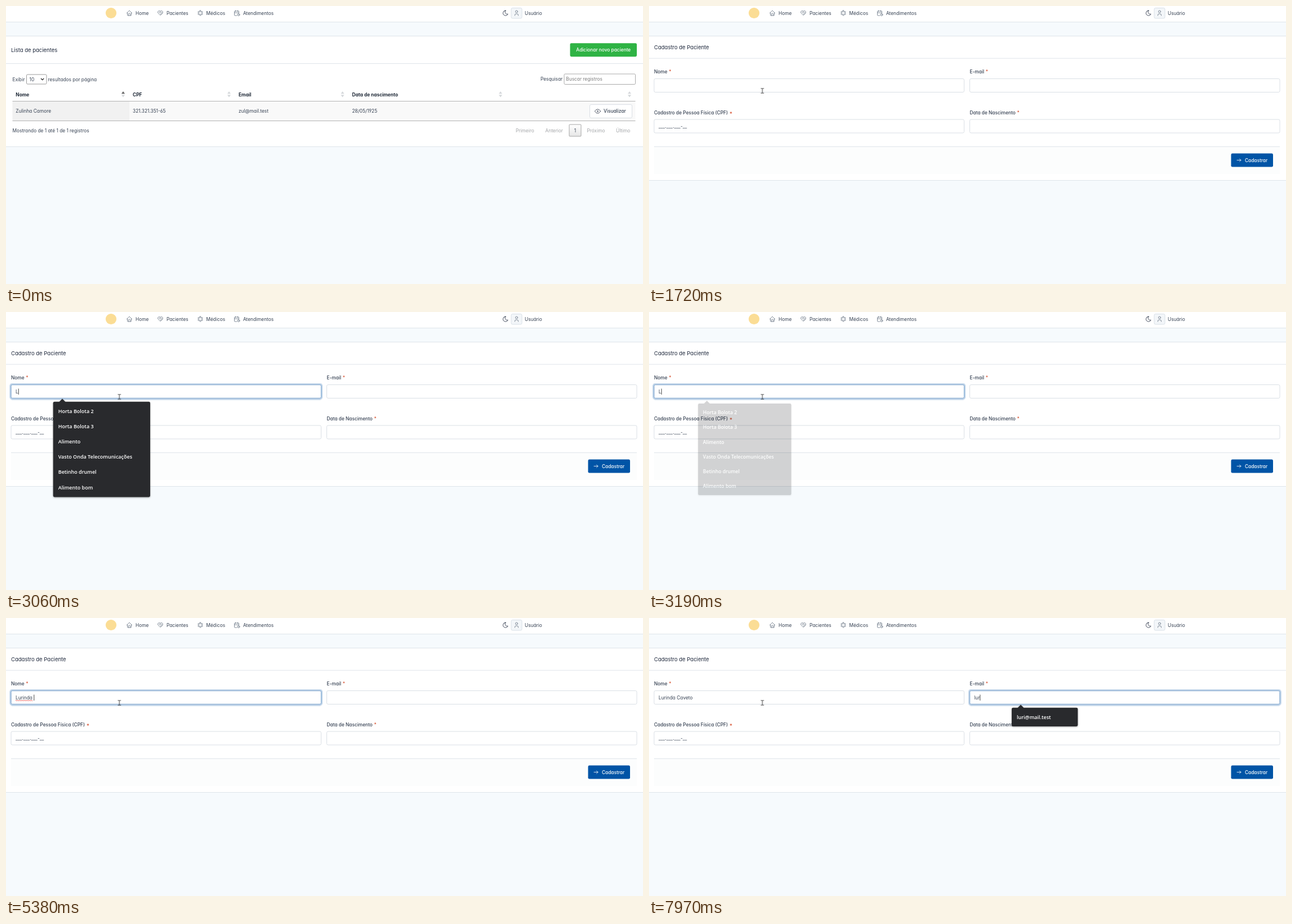
An HTML page that plays this animation: 1131 by 495 pixels, repeating every 8000 ms.

```html
<!DOCTYPE html>
<html lang="pt-BR">
<head>
<meta charset="utf-8">
<title>Cadastro de Paciente</title>
<style>
html, body { margin: 0; width: 100%; height: 100%; overflow: hidden; background: #f6fafd; }
svg { display: block; width: 1131px; height: 495px; }
text {
  font: 400 8.32px Inter, sans-serif;
  font-feature-settings: "cv03", "cv04", "cv11";
  fill: #354052;
}
.title { font-size: 9.5px; fill: #1d273b; }
.med { font-weight: 500; }
.bold { font-weight: 700; fill: #1f2937; }
.white { fill: #fff; }
.mute { fill: #a3a5a8; }
.req { fill: #d6502f; }
.mid { text-anchor: middle; }
.line { stroke: #dfe5ea; fill: none; }
.box { fill: #fff; stroke: #dadfe5; }
.icon { fill: none; stroke: #667382; stroke-width: 1.6; stroke-linecap: round; stroke-linejoin: round; }
.icon.dark { stroke: #1d273b; }
.popup { transform-box: fill-box; transform-origin: center; filter: drop-shadow(0 1px 1.5px rgba(0, 0, 0, .35)); }
.popup > * { fill: #292a2d; }
.popup text { font: 600 9px "Open Sans", "Noto Sans", sans-serif; fill: #fff; }
.ring rect { fill: none; stroke: #80aad3; }
.ring .glow { stroke: rgba(0, 84, 166, .25); stroke-width: 2.4; }

#list, #form, #add, #names, #mails, #squiggle { animation: 8s step-end infinite; }
#list { animation-name: list; }
#form { animation-name: form; }
#add { fill: #2fb344; animation-name: hover; }
#names { animation-name: names; }
#mails { animation-name: mails; }
#squiggle { fill: none; stroke: #e0302a; stroke-width: .7; animation-name: squiggle; }
#ringName { animation: ringName 8s linear infinite; }
#ringMail { animation: ringMail 8s linear infinite; }
#arrow { animation: arrow 8s infinite; }
#beam { animation: beam 8s infinite; }

@keyframes list { 0% { visibility: visible } 11.625%, 100% { visibility: hidden } }
@keyframes form { 0% { visibility: hidden } 11.625%, 100% { visibility: visible } }
@keyframes hover { 0% { fill: #2fb344 } 6.7%, 100% { fill: #2aa13d } }
@keyframes names {
  0% { opacity: 0; transform: scale(.97) }
  23.1% { opacity: .5; transform: scale(.98) }
  24% { opacity: 1; transform: none }
  39% { opacity: .6; transform: scale(.98) }
  39.875% { opacity: .2; transform: scale(.96) }
  40.6%, 100% { opacity: 0; transform: scale(.95) }
}
@keyframes mails {
  0% { opacity: 0 }
  96.25% { opacity: .5; transform: scale(.98) }
  97.125%, 100% { opacity: 1; transform: none }
}
@keyframes squiggle { 0% { opacity: 0 } 59% { opacity: 1 } 82.25%, 100% { opacity: 0 } }
@keyframes ringName { 0%, 22.375% { opacity: 0 } 23.8%, 82.25% { opacity: 1 } 84%, 100% { opacity: 0 } }
@keyframes ringMail { 0%, 82.25% { opacity: 0 } 83.875%, 100% { opacity: 1 } }
@keyframes arrow {
  0% { visibility: hidden; transform: translate(1064px, 448px); animation-timing-function: step-end }
  .875% { visibility: visible; transform: translate(1064px, 448px); animation-timing-function: steps(5) }
  5% { visibility: visible; transform: translate(1052px, 190px); animation-timing-function: steps(3) }
  7.5% { visibility: visible; transform: translate(1045px, 62px); animation-timing-function: steps(3) }
  10% { visibility: visible; transform: translate(1036px, 80px); animation-timing-function: step-end }
  11.625% { visibility: visible; transform: translate(1026px, 86px); animation-timing-function: step-end }
  12.5% { visibility: visible; transform: translate(1005.5px, 98.5px); animation-timing-function: steps(6) }
  17.375% { visibility: hidden; transform: translate(560px, 129px); animation-timing-function: step-end }
  100% { visibility: hidden; transform: translate(560px, 129px) }
}
@keyframes beam {
  0% { visibility: hidden; transform: translate(556px, 129px); animation-timing-function: step-end }
  17.375% { visibility: visible; transform: translate(556px, 129px); animation-timing-function: steps(5) }
  21.5%, 100% { visibility: visible; transform: translate(201.3px, 151px) }
}
</style>
</head>
<body>
<svg viewBox="0 0 1131 495">
  <defs>
    <linearGradient id="fade" x2="0" y2="1"><stop stop-color="#fff"/><stop offset="1" stop-color="#e6e6e6"/></linearGradient>
    <g id="sort"><path d="M-3 156.3h6l-3-4.3z"/><path d="M-3 158.2h6l-3 4.3z"/></g>
    <rect id="field" width="550.5" height="24" rx="2.4"/>
    <g id="ring" class="ring">
      <use href="#field"/>
      <rect width="550.5" height="24" rx="2.4"/>
      <rect class="glow" x="-1.5" y="-1.5" width="553.5" height="27" rx="3.6"/>
    </g>
  </defs>

  <rect width="1131" height="495" fill="#f6fafd"/>

  <!-- navbar -->
  <rect width="1131" height="28.5" fill="#fff"/>
  <path class="line" d="M0 28.5h1131"/>
  <circle cx="186.5" cy="12.5" r="9.6" fill="#fbdd95"/>
  <g class="icon">
    <g transform="translate(213 6.5) scale(.5)">
      <path d="M5 12H3l9-9 9 9h-2M5 12v7a2 2 0 0 0 2 2h10a2 2 0 0 0 2-2v-7M9 21v-6a2 2 0 0 1 2-2h2a2 2 0 0 1 2 2v6"/>
    </g>
    <g transform="translate(268 6.5) scale(.5)">
      <path d="M19.5 12.6 12 20l-7.5-7.4A5 5 0 1 1 12 6a5 5 0 1 1 7.5 6.6M12 6 8.7 9.3a1 1 0 0 0 0 1.4l.5.5a1.8 1.8 0 0 0 2.5 0l1-1a3.2 3.2 0 0 1 4.5 0l2.3 2.3M12.5 15.5l2 2M15 13l2 2"/>
    </g>
    <g transform="translate(339 6.5) scale(.5)">
      <path d="M11 3h2a1 1 0 0 1 1 1v4.5l4.5-2.5 2 3.4-4.5 2.6 4.5 2.6-2 3.4-4.5-2.5V20a1 1 0 0 1-1 1h-2a1 1 0 0 1-1-1v-4.500l-4.500 2.500-2-3.400L8 12 3.500 9.400l2-3.400L10 8.500V4a1 1 0 0 1 1-1z"/>
    </g>
    <g transform="translate(404 6.500) scale(.5)">
      <path d="M11.800 21H5a2 2 0 0 1-2-2V7a2 2 0 0 1 2-2h12a2 2 0 0 1 2 2v4M15 3v4M7 3v4M3 11h16M18 16.500V18l.5.5"/>
      <circle cx="18" cy="18" r="4"/>
    </g>
  </g>
  <text x="230" y="15.6">Home</text>
  <text x="285" y="15.6">Pacientes</text>
  <text x="355.5" y="15.6">Médicos</text>
  <text x="421" y="15.6">Atendimentos</text>
  <g class="icon dark" transform="translate(881 6.5) scale(.5)"><path d="M12 3h.4a7.5 7.5 0 0 0 7.9 12.400A9 9 0 1 1 12 3z"/></g>
  <rect x="897" y="3.5" width="19" height="18.5" rx="2.4" fill="#f3f6f9" stroke="#d9e0e7"/>
  <g class="icon" transform="translate(900.5 6.500) scale(.5)"><circle cx="12" cy="7" r="4"/><path d="M6 21v-2a4 4 0 0 1 4-4h4a4 4 0 0 1 4 4v2"/></g>
  <text x="921" y="15.6">Usuário</text>

  <g id="list">
    <path fill="#fff" d="M0 53.5h1131v197H0z"/>
    <path class="line" d="M0 53.5h1131M0 102.5h1131M0 250.5h1131"/>
    <text class="title" x="9" y="81.8">Lista de pacientes</text>
    <rect id="add" x="1001.5" y="66.2" width="118.5" height="24" rx="2.4"/>
    <text class="med white mid" x="1060.8" y="81.3">Adicionar novo paciente</text>

    <text x="11.5" y="133.6">Exibir</text>
    <rect x="36.500" y="122" width="35.500" height="17" rx="1.800" fill="#fff" stroke="#9a9a9a"/>
    <text x="41.500" y="133.6">10</text>
    <path d="m62 129 2.600 2.600 2.600-2.600" fill="none" stroke="#222" stroke-width="1.300"/>
    <text x="74.500" y="133.600">resultados por página</text>
    <text x="949" y="133.200">Pesquisar</text>
    <rect x="991" y="121" width="126.500" height="18.500" rx="1.800" fill="#fff" stroke="#aaa"/>
    <text x="994.300" y="133.200" style="fill:#7b7b7b">Buscar registros</text>

    <g class="head">
      <text class="bold" x="17.300" y="160.800">Nome</text>
      <text class="bold" x="225" y="160.800">CPF</text>
      <text class="bold" x="413" y="160.800">Email</text>
      <text class="bold" x="614.500" y="160.800">Data de nascimento</text>
    </g>
    <g fill="#d5d8db">
      <use href="#sort" x="208"/><use href="#sort" x="396"/><use href="#sort" x="597.500"/><use href="#sort" x="878"/><use href="#sort" x="1107"/>
    </g>
    <path d="M205 156.300h6l-3-4.300z" fill="#666"/>
    <path fill="#f9f9f9" d="M11.500 170h1106v34.500h-1106z"/>
    <path fill="#f1f1f1" d="M11.500 170h207.500v34.500H11.500z"/>
    <path d="M11.500 169.500h1106M11.500 204.500h1106" stroke="#b2b2b2"/>
    <text x="17.300" y="190.400">Zulinha Camore</text>
    <text x="225" y="190.400">321.321.351-65</text>
    <text x="413" y="190.400">zul@mail.test</text>
    <text x="614.500" y="190.400">28/05/1925</text>
    <rect class="box" x="1036.500" y="175.500" width="75" height="23.800" rx="2.400"/>
    <g class="icon dark" transform="translate(1044.500 181.400) scale(.5)"><circle cx="12" cy="12" r="2"/><path d="M22 12c-2.700 4.700-6 7-10 7s-7.300-2.300-10-7c2.700-4.700 6-7 10-7s7.300 2.300 10 7"/></g>
    <text class="med" x="1061" y="190.400">Visualizar</text>

    <text x="11.500" y="224.600">Mostrando de 1 até 1 de 1 registros</text>
    <text class="mute" x="905" y="224.600">Primeiro</text>
    <text class="mute" x="957.500" y="224.600">Anterior</text>
    <rect x="1000" y="211" width="21" height="21" rx="1" fill="url(#fade)" stroke="#a5a5a5"/>
    <text class="mid" x="1010.500" y="224.600">1</text>
    <text class="mute" x="1031.500" y="224.600">Próximo</text>
    <text class="mute" x="1083" y="224.600">Último</text>
  </g>

  <g id="form">
    <path fill="#fff" d="M0 53.500h1131v257H0z"/>
    <path fill="#fcfdfd" d="M9 251h1111v48H9z"/>
    <path class="line" d="M0 53.500h1131M0 93.200h1131M9 250.500h1111M0 310.500h1131"/>
    <text class="title" x="9" y="77">Cadastro de Paciente</text>
    <text class="med" x="9" y="120.400">Nome<tspan class="req" dx="2.700">*</tspan></text>
    <text class="med" x="569.500" y="120.400">E-mail<tspan class="req" dx="2.700">*</tspan></text>
    <text class="med" x="9" y="192.700">Cadastro de Pessoa Física (CPF)<tspan class="req" dx="2.700">*</tspan></text>
    <text class="med" x="569.500" y="192.700">Data de Nascimento<tspan class="req" dx="2.700">*</tspan></text>
    <g class="box">
      <use href="#field" x="9" y="129.500"/><use href="#field" x="569.500" y="129.500"/>
      <use href="#field" x="9" y="202"/><use href="#field" x="569.500" y="202"/>
    </g>
    <g fill="none">
      <use id="ringName" href="#ring" x="9" y="129.500"/>
      <use id="ringMail" href="#ring" x="569.500" y="129.500"/>
    </g>
    <text id="name" x="17" y="144.600"></text>
    <text id="mail" x="577.300" y="144.600"></text>
    <text x="17" y="217">___.___.___-__</text>
    <path id="squiggle"/>
    <path id="caret" d="M.5 136.500v10.500" stroke="#333" stroke-width=".9"/>
    <rect x="1033.500" y="262.600" width="74.500" height="24" rx="2.400" fill="#0054a6"/>
    <g class="icon" transform="translate(1041.500 268.500) scale(.5)" style="stroke:#fff"><path d="M5 12h14M14 17l5-5-5-5"/></g>
    <text class="med white" x="1058" y="277.600">Cadastrar</text>
  </g>

  <g id="names" class="popup">
    <path d="m94 160.500 6-6 6 6z"/>
    <rect x="83.700" y="159.800" width="172.300" height="169.700" rx="2.400"/>
  </g>
  <g id="mails" class="popup">
    <path d="m654 160.500 6-6 6 6z"/>
    <rect x="644" y="159.800" width="117.300" height="33.200" rx="2.400"/>
  </g>

  <path id="arrow" d="M0 0v9.800l2.300-2.100 1.500 3.500 1.500-.7-1.500-3.300h3z" fill="#fff" stroke="#222" stroke-width=".8"/>
  <path id="beam" d="M-2.700-4.200h2l.7.5.7-.5h2M0-3.700v7.400M-2.700 4.200h2l.7-.5.7.5h2" fill="none" stroke="#222" stroke-width=".9"/>
</svg>

<script>
const LOOP = 8000;
const $ = id => document.getElementById(id);

function addItems(popup, x, items) {
  items.forEach((label, i) => {
    const text = document.createElementNS('http://www.w3.org/2000/svg', 'text');
    text.setAttribute('x', x);
    text.setAttribute('y', 180 + 27.1 * i);
    text.textContent = label;
    popup.append(text);
  });
}
addItems($('names'), 92.7, ['Horta Bolota 2', 'Horta Bolota 3', 'Alimento',
  'Vasto Onda Telecomunicações', 'Betinho drumel', 'Alimento bom']);
addItems($('mails'), 653, ['luri@mail.test']);
$('squiggle').setAttribute('d', 'M17 147' + 'q.75-1.800 1.500 0t1.500 0'.repeat(10));

// '<' is a backspace; caret is hidden during the off interval
const inputs = [
  { el: $('name'), x: 17, focus: 1790, blur: 6580, off: [2320, 2850], keys: 'Lurinda Ca<<Caveto',
    times: [3060, 3320, 3580, 3780, 3980, 4380, 4520, 4650, 4780,
      5050, 5240, 5380, 5580, 5980, 6050, 6180, 6250, 6380] },
  { el: $('mail'), x: 577.3, focus: 6580, blur: LOOP, off: [7110, 7570], keys: 'lur',
    times: [7570, 7700, 7970] }
];

function typed({ keys, times }, t) {
  let out = '';
  times.forEach((time, i) => {
    if (t >= time) out = keys[i] === '<' ? out.slice(0, -1) : out + keys[i];
  });
  return out.replace(/ /g, '\u00a0');
}

function render(t) {
  let caretX = null;
  for (const input of inputs) {
    const { el, x, focus, blur, off } = input;
    const value = typed(input, t);
    if (el.textContent !== value) el.textContent = value;
    const blink = t >= off[0] && t < off[1];
    if (t >= focus && t < blur && !blink) caretX = x + (value ? el.getComputedTextLength() : 0);
  }
  $('caret').style.opacity = caretX === null ? 0 : 1;
  if (caretX !== null) $('caret').setAttribute('transform', `translate(${caretX} 0)`);
}

let start;
function tick(now) {
  start ??= now;
  render((now - start) % LOOP);
  requestAnimationFrame(tick);
}
requestAnimationFrame(tick);
</script>
</body>
</html>
```
